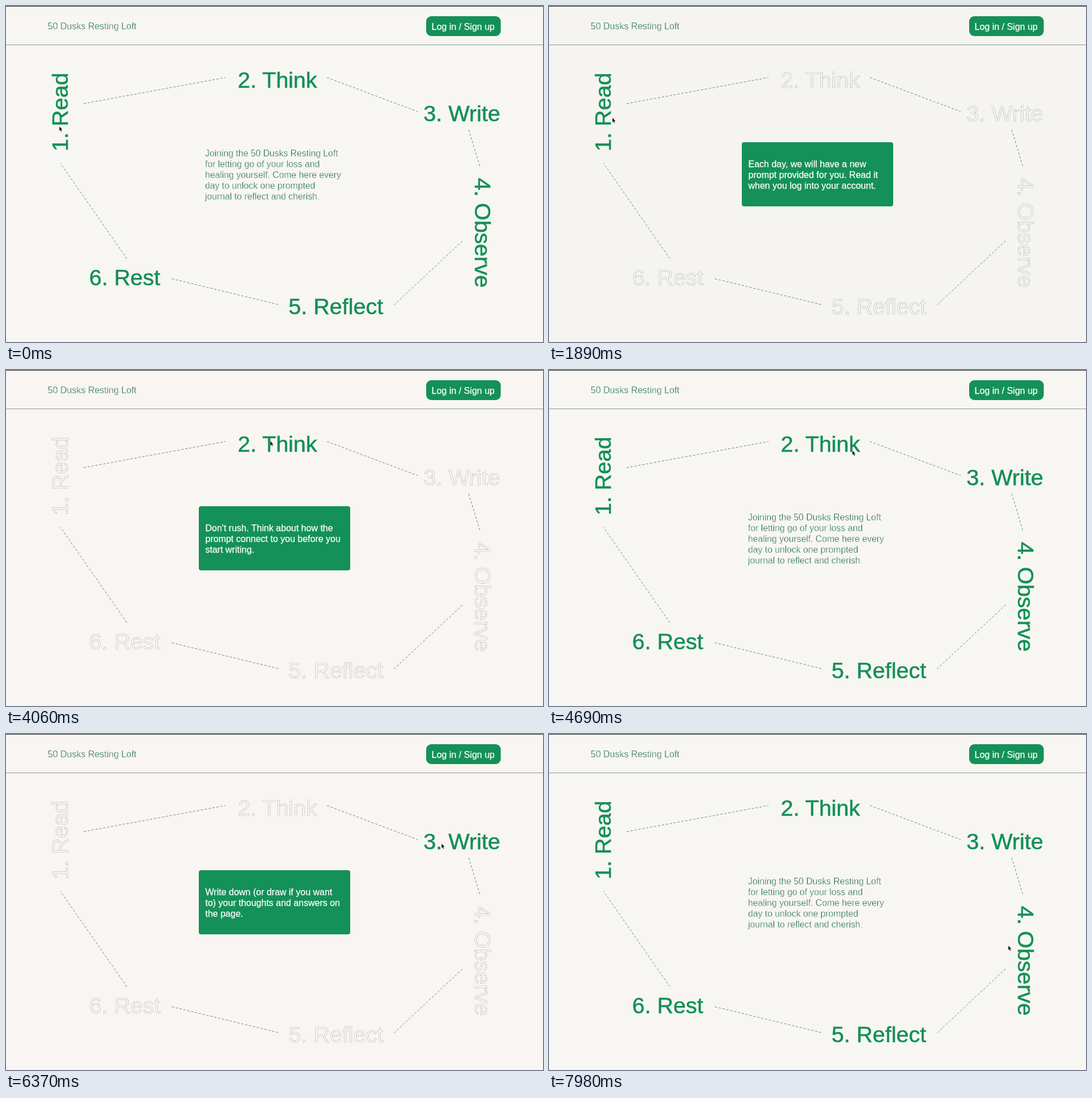
An HTML page for the animation above (8000 ms loop, 947 by 592 pixels).

```html
<!DOCTYPE html>
<html lang="en">
<head>
<meta charset="utf-8">
<title>50 Dusks Resting Loft</title>
<style>
  html, body { margin: 0; width: 100%; height: 100%; overflow: hidden; background: #f7f6f2; }
  svg { display: block; width: 100%; height: 100%; --bg: #f7f6f2; background: var(--bg); }
  text { font: 16px "Liberation Sans", Arial, sans-serif; white-space: pre; }
  .light { fill: #1d6a48; stroke: var(--bg); stroke-width: .42px; }
  .light text { font-size: 15.75px; }
  .white { fill: #fff; stroke: #fff; stroke-width: .25px; }
  .label text { font-size: 39.5px; }
  .solid { fill: #148f57; stroke: #148f57; stroke-width: .6px; }
  .ghost { fill: none; stroke: #3f6352; stroke-width: .7px; stroke-dasharray: 1 2; }
  .links { fill: none; stroke: #2c6a4d; stroke-width: .75px; stroke-dasharray: 4 3; }
</style>
</head>
<body>
<svg id="stage" viewBox="0 0 947 592" preserveAspectRatio="none">
  <rect width="947" height="1" fill="#222"/>
  <rect y="68" width="947" height="1" fill="#829c90"/>
  <text class="light" x="73.5" y="41">50 Dusks Resting Loft</text>
  <rect x="741" y="18" width="131.5" height="35" rx="9" fill="#149158"/>
  <text class="white" x="750.5" y="42">Log in / Sign up</text>
  <path class="links" d="M137 172L387 126M566 126L726 186M816 218L836 284M805 414L684 527M480 526L290 480M213 445L96 277"/>
  <g id="labels"></g>
  <g id="intro" class="light"></g>
  <g id="panel">
    <rect x="340" y="240" width="267" height="113" rx="4" fill="#149158"/>
    <g id="note" class="white"></g>
  </g>
  <path id="cursor" d="M0 0V8.2L1.9 6.6L3.3 9.6L4.6 9L3.3 6.1L5.6 5.9Z" fill="#000" stroke="#fff" stroke-width=".4"/>
</svg>
<script>
const $ = id => document.getElementById(id);
const FADE = 200, LOOP = 8000;
const BASE = [247, 246, 242];

const labels = [
  ["1. Read", 109, 256, -90],
  ["2. Think", 408.8, 144, 0],
  ["3. Write", 736.3, 203, 0],
  ["4. Observe", 827, 303, 90],
  ["5. Reflect", 498.3, 543, 0],
  ["6. Rest", 146.8, 492, 0]
];

// Each hover belongs to the label at the same index.
const hovers = [
  { on: 420, off: 1900, bg: [245, 244, 240],
    lines: ["Each day, we will have a new", "prompt provided for you. Read it", "when you log into your account."] },
  { on: 3000, off: 4480, bg: [249, 245, 242],
    lines: ["Don't rush. Think about how the", "prompt connect to you before you", "start writing."] },
  { on: 6130, off: 7280, bg: [249, 245, 242],
    lines: ["Write down (or draw if you want", "to) your thoughts and answers on", "the page."] }
];

// Pointer stops: time, x, y
const stops = [
  [0, 94, 212], [900, 97, 204], [1800, 99, 200], [2550, 421, 120], [2800, 425, 121],
  [4060, 466, 125], [4400, 470, 128], [5350, 762, 190], [5600, 764, 191],
  [6020, 766, 192], [6160, 766, 192], [6370, 768, 193], [7150, 770, 196],
  [7800, 809, 368], [8000, 810, 373]
];

const block = (lines, x, y) => lines.map((s, i) =>
  `<text x="${x}" y="${y + i * 19.2}">${s}</text>`).join("");

$("intro").innerHTML = block([
  "Joining the 50 Dusks Resting Loft", "for letting go of your loss and",
  "healing yourself. Come here every", "day to unlock one prompted",
  "journal to reflect and cherish."], 351, 264.5);

$("labels").innerHTML = labels.map(([s, x, y, turn]) =>
  `<g class="label" transform="translate(${x} ${y}) rotate(${turn})">` +
  `<text class="ghost">${s}</text><text class="solid">${s}</text></g>`).join("");

const clamp = v => Math.max(0, Math.min(1, v));
const ease = v => v * v * (3 - 2 * v);
const mix = (a, b, k) => a + (b - a) * k;

function pointer(t) {
  const i = Math.max(1, stops.findIndex(s => s[0] > t));
  const [t0, x0, y0] = stops[i - 1], [t1, x1, y1] = stops[i];
  const k = ease((t - t0) / (t1 - t0));
  return [mix(x0, x1, k), mix(y0, y1, k)];
}

let shown = -1;
function draw(t) {
  const active = hovers.findIndex(h => t >= h.on && t < h.off + FADE);
  const h = hovers[active];
  const k = h ? clamp((t - h.on) / FADE) * clamp((h.off + FADE - t) / FADE) : 0;

  if (h && active !== shown) {
    $("note").innerHTML = block(h.lines, 351.5, 284);
    shown = active;
  }
  const bg = BASE.map((c, i) => h ? mix(c, h.bg[i], k) : c);
  $("stage").style.setProperty("--bg", `rgb(${bg})`);
  $("panel").style.opacity = k;
  $("intro").style.opacity = 1 - k;
  [...$("labels").children].forEach((g, i) => {
    const gone = i === active ? 0 : k;
    g.firstChild.style.opacity = gone;
    g.lastChild.style.opacity = 1 - gone;
  });
  $("cursor").setAttribute("transform", `translate(${pointer(t)})`);
}

let start;
function loop(now) {
  start ??= now;
  draw((now - start) % LOOP);
  requestAnimationFrame(loop);
}
requestAnimationFrame(loop);
</script>
</body>
</html>
```
